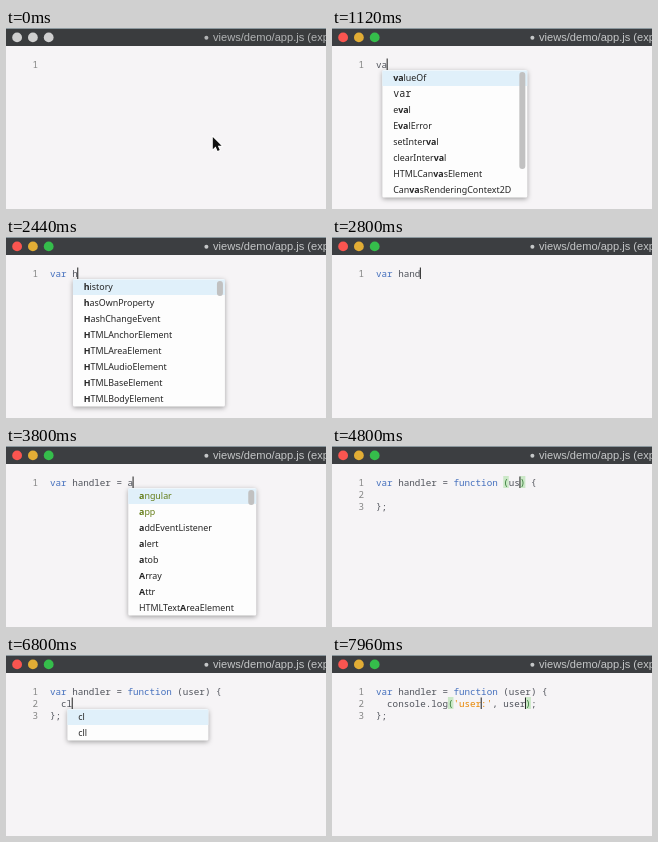
Write an HTML page with a canvas that moves like this. It is 320 px wide and 181 px high and loops after 8 s.

```html
<!DOCTYPE html>
<html lang="en">
<head>
<meta charset="utf-8">
<title>Editor typing</title>
<style>
html, body { margin: 0; width: 100%; height: 100%; overflow: hidden; background: #f6f4f6; }
canvas { display: block; width: 320px; height: 181px; }
</style>
</head>
<body>
<canvas id="stage"></canvas>
<script>
const LOOP = 8000, ACTIVATE = 240, FIRST_KEY = 800, CARET_ON = 600;
const LEFT = 44, TOP = 31, CHAR = 5.532, LINE = 12, ROW = 16;
const MONO = '9.22px "Noto Sans Mono", monospace';
const MENU = '8.9px "Noto Sans", sans-serif';

const canvas = document.getElementById('stage');
const ctx = canvas.getContext('2d');
const scale = window.devicePixelRatio || 1;
canvas.width = 320 * scale;
canvas.height = 181 * scale;

// "~" marks a name from this file, "`" a keyword
const menu = (query, width, items, thumb = 0) => ({ query, width, items: items.split(' '), thumb });
const menus = {
  v: menu('v', 145, 'valueOf `var `void eval EvalError setInterval clearInterval navigator', 40),
  va: menu('va', 145, 'valueOf `var eval EvalError setInterval clearInterval HTMLCanvasElement CanvasRenderingContext2D', 97),
  var: menu('var', 145, '`var'),
  h: menu('h', 152, 'history hasOwnProperty HashChangeEvent HTMLAnchorElement HTMLAreaElement HTMLAudioElement HTMLBaseElement HTMLBodyElement', 15),
  ha: menu('ha', 162, 'hasOwnProperty HashChangeEvent charAt charCodeAt SharedWorker HTMLHeadElement CharacterData hash', 40),
  a: menu('a', 128, '~angular ~app addEventListener alert atob Array Attr HTMLTextAreaElement', 15),
  af: menu('', 141, 'af'),
  c: menu('c', 145, '`case `catch clearInterval clearTimeout close closed confirm console', 15),
  cl: menu('', 141, 'cl cll')
};

// "|" is a caret
const head = 'var handler = function (user) {\n  ', tail = '\n};';
const log = word => `${head}console.log('${word}|:', ${word}|);${tail}`;
const steps = [
  [ACTIVATE, '|'],
  [800, 'v|', menus.v],
  [960, 'va|', menus.va],
  [1160, 'var|', menus.var],
  [1400, 'var |'],
  [2360, 'var h|', menus.h],
  [2600, 'var ha|', menus.ha],
  [2720, 'var han|'],
  [2800, 'var hand|'],
  [2880, 'var handl|'],
  [2960, 'var handle|'],
  [3080, 'var handler|'],
  [3240, 'var handler |'],
  [3360, 'var handler =|'],
  [3520, 'var handler = |'],
  [3800, 'var handler = a|', menus.a],
  [3960, 'var handler = af|', menus.af],
  [4200, 'var handler = function (|) {\n\n};'],
  [4680, 'var handler = function (u|) {\n\n};'],
  [4800, 'var handler = function (us|) {\n\n};'],
  [5040, 'var handler = function (use|) {\n\n};'],
  [5120, 'var handler = function (user|) {\n\n};'],
  [5400, head + '|' + tail],
  [6360, head + 'c|' + tail, menus.c],
  [6560, head + 'cl|' + tail, menus.cl],
  [6880, log('')],
  [7360, log('us')],
  [7520, log('use')],
  [7640, log('user')]
];

function rect(x, y, w, h, color) {
  ctx.fillStyle = color;
  ctx.fillRect(x, y, w, h);
}

function rounded(x, y, w, h, r, color) {
  ctx.fillStyle = color;
  ctx.beginPath();
  ctx.roundRect(x, y, w, h, r);
  ctx.fill();
}

function text(value, x, y, font, color, align = 'left') {
  ctx.font = font;
  ctx.fillStyle = color;
  ctx.textAlign = align;
  ctx.fillText(value, x, y);
  return x + ctx.measureText(value).width;
}

function drawTitleBar(active) {
  rect(0, 0, 320, 18, active ? '#3c3e41' : '#3a3c3e');
  rect(0, 0, 320, 1, '#8b979d');
  const lights = active ? ['#fa5550', '#e2ad35', '#35bd4b'] : ['#cfcfcf', '#cfcfcf', '#cfcfcf'];
  lights.forEach((color, i) => rounded(6.2 + i * 15.8, 4.5, 9.8, 9.8, 4.9, color));
  const ink = active ? '#c5c7c8' : '#b2b4b5';
  rounded(198.4, 7.8, 4, 4, 2, ink);
  text('views/demo/app.js (exp', 207, 13, '11.1px "Liberation Sans", Arial, sans-serif', ink);
}

function drawLine(source, row, caretOn) {
  const carets = [];
  const code = [...source].filter(char => char !== '|').join('');
  [...source].forEach((char, i) => char === '|' && carets.push(i - carets.length));
  const y = TOP + row * LINE, xAt = col => LEFT + col * CHAR;

  text(row + 1, 32, y + 9, MONO, '#858585', 'right');
  const close = carets.find(col => code[col] === ')');
  const matched = close === undefined ? [] : [code.lastIndexOf('(', close), close];
  matched.forEach(col => rect(xAt(col), y - 1, CHAR, LINE, '#cbe8c7'));

  for (const { 0: token, index } of code.matchAll(/'[^']*'|\w+|[^\s\w]/g)) {
    const color = token[0] === "'" ? '#e88501'
      : /^(var|function)$/.test(token) ? '#446fbd'
      : matched.includes(index) ? '#347a35' : '#50535b';
    text(token, xAt(index), y + 9, MONO, color);
  }
  if (caretOn) carets.forEach(col => rect(xAt(col) - 0.4, y - 0.5, 1, 11.5, '#202020'));
  return carets.length ? { x: xAt(carets[0]), y } : null;
}

function drawItem(item, query, x, y) {
  if (item[0] === '`') return text(item.slice(1), x, y, '10px "Noto Sans Mono", monospace', '#222');
  const known = item[0] === '~', name = known ? item.slice(1) : item;
  const color = known ? '#647d18' : '#252525';
  const start = Math.max(0, name.toLowerCase().indexOf(query)), end = start + query.length;
  x = text(name.slice(0, start), x, y, MENU, color);
  x = text(name.slice(start, end), x, y, 'bold ' + MENU, color);
  text(name.slice(end), x, y, MENU, color);
}

function drawMenu({ query, width, items, thumb }, caret) {
  const x = caret.x - CHAR + 0.8, y = caret.y + 11;
  ctx.save();
  ctx.shadowColor = 'rgba(0,0,0,.35)';
  ctx.shadowBlur = 5 * scale;
  ctx.shadowOffsetY = 1.5 * scale;
  rounded(x, y, width, items.length * ROW - 0.5, 1.5, '#fdfdfd');
  ctx.restore();
  rect(x, y + 0.5, width, ROW - 0.5, '#e0f0fa');
  items.forEach((item, i) => drawItem(item, query, x + 10.8, y + i * ROW + 11.4));
  if (thumb) rounded(x + width - 8, y + 2, 6, thumb, 3, '#c1c1c1');
}

function drawPointer(x, y) {
  const arrow = new Path2D('M0 0V12.2L2.8 9.6L4.8 14L6.9 13L5 8.8H8.8Z');
  ctx.save();
  ctx.translate(x, y);
  ctx.strokeStyle = '#fff';
  ctx.lineWidth = 1.6;
  ctx.stroke(arrow);
  ctx.fillStyle = '#111';
  ctx.fill(arrow);
  ctx.restore();
}

function draw(now) {
  const time = now % LOOP;
  const [since, source, list] = steps.findLast(([at]) => at <= time) || [0, ''];
  const caretOn = Math.floor((time - since) / CARET_ON) % 2 === 0;
  ctx.setTransform(scale, 0, 0, scale, 0, 0);
  rect(0, 0, 320, 181, '#f6f4f6');
  drawTitleBar(time >= ACTIVATE);
  const caret = source.split('\n').map((line, row) => drawLine(line, row, caretOn)).find(Boolean);
  if (list) drawMenu(list, caret);
  if (time < FIRST_KEY) drawPointer(206.8, 109);
  requestAnimationFrame(draw);
}
requestAnimationFrame(draw);
</script>
</body>
</html>
```
